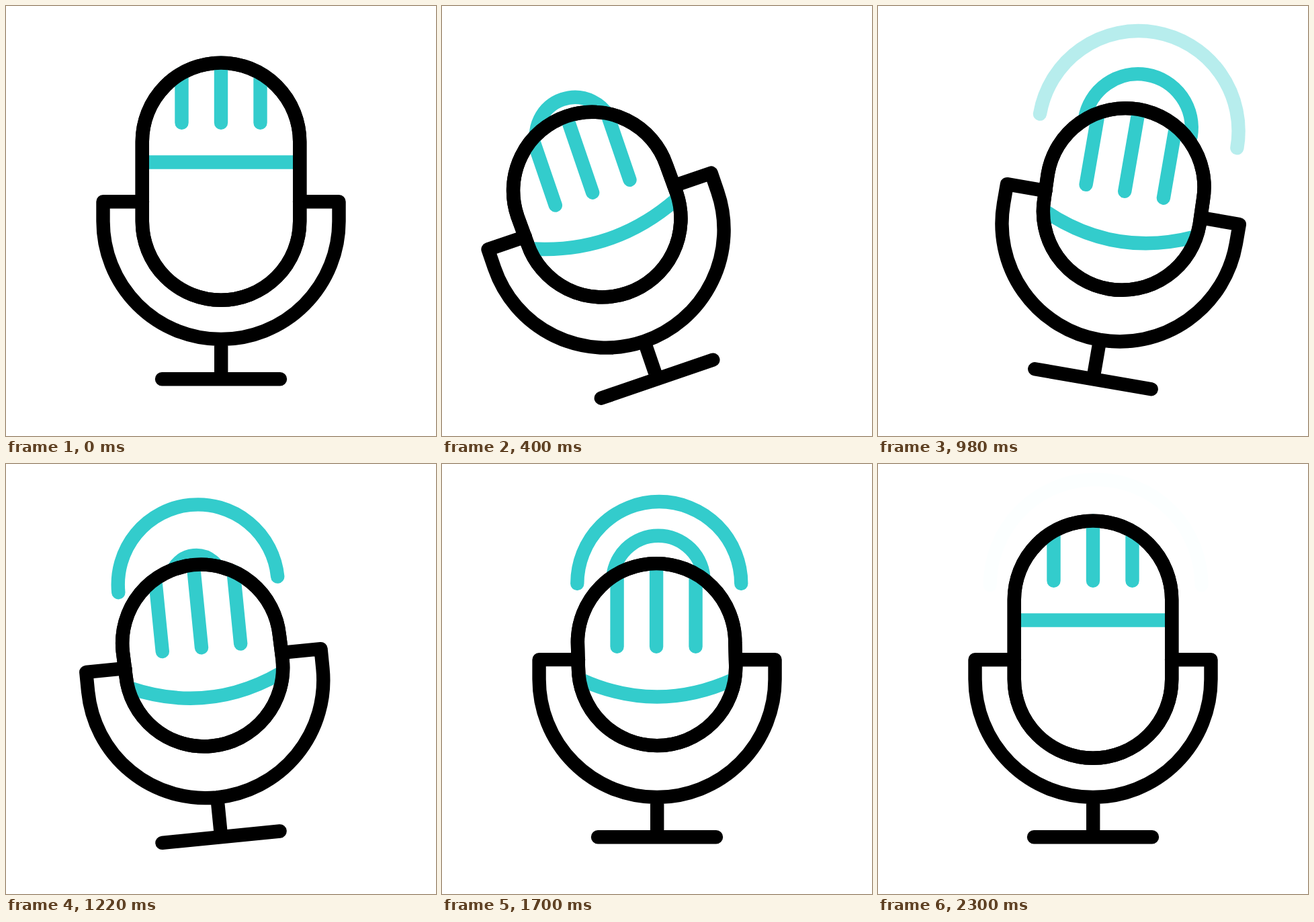
An HTML page for the animation above (2.4 s loop, 640 px wide and 640 px high).

```html
<!DOCTYPE html>
<html lang="en">
<head>
<meta charset="utf-8">
<title>Microphone</title>
<style>
  html, body { margin: 0; width: 100%; height: 100%; overflow: hidden; background: #fff; }
  svg { display: block; width: 100%; height: 100%; }
  path { fill: none; stroke: #000; stroke-width: 20.4; stroke-linecap: round; stroke-linejoin: round; }
  .teal, #waves path { stroke: #33cccc; }
  #band { stroke-linecap: butt; }
  #shell { fill: #fff; }
  #rim { fill: none; }
</style>
</head>
<body>
<svg viewBox="0 0 640 640">
  <g id="mic">
    <g id="waves"></g>
    <path id="shell"/>
    <path id="bars" class="teal"/>
    <path id="band" class="teal"/>
    <path id="rim"/>
    <path d="M203 291.2H144.5V320.5A175.5 175.5 0 0 0 495.5 320.5V291.2H437M320.2 496V555.2M232 555.2H408"/>
  </g>
</svg>
<script>
const LOOP = 2400, REST = 2300;
const R = 117.2;
const WAVE_DELAYS = [0, 460, 920, 1248];
// start, end, change in degrees
const SWINGS = [
  [0, 590, -25], [605, 920, 37], [920, 1195, -18], [1195, 1415, 9], [1415, 1712, -3]
];

const el = id => document.getElementById(id);
const [mic, shell, rim, bars, band] = ['mic', 'shell', 'rim', 'bars', 'band'].map(el);
const waves = WAVE_DELAYS.map(() =>
  el('waves').appendChild(document.createElementNS('http://www.w3.org/2000/svg', 'path')));

function ease(t, from, to) {
  const s = Math.min(1, Math.max(0, (t - from) / (to - from)));
  return s * s * (3 - 2 * s);
}

function drawWave(path, t) {
  const r = 58 + 0.1754 * (t - 400) - 5.85e-5 * (t - 400) * (t - 660);
  const alpha = 1 - ease(t, 850, 1067);
  const shown = t > 0 && r > 1 && alpha > 0;
  path.style.display = shown ? '' : 'none';
  if (!shown) return;
  const cx = 320 + 0.026 * r, cy = 170 + 0.066 * r;
  path.setAttribute('d', `M${cx - r} ${cy}A${r} ${r} 0 0 1 ${cx + r} ${cy}`);
  path.style.opacity = alpha;
}

function drawHead(t) {
  const press = ease(t, 0, 500) - ease(t, 1750, 2250);
  const lift = ease(t, 0, 450) - ease(t, 1690, 2200);
  const x = 320 - press;
  const top = 201.8 + 63.5 * press;
  const bottom = 320.5 - 18.6 * lift;

  const capsule = `M${x - R} ${top}A${R} ${R} 0 0 1 ${x + R} ${top}L${320 + R} ${bottom}` +
    `A${R} ${R} 0 0 1 ${320 - R} ${bottom}Z`;
  shell.setAttribute('d', capsule);
  rim.setAttribute('d', capsule);

  const barEnd = 173.8 + 98 * press;
  bars.setAttribute('d', [-58.5, 0, 58.5].map(dx =>
    `M${x + dx} ${top - Math.sqrt(R * R - dx * dx)}V${barEnd}`).join(''));

  const side = 232.5 + 88.5 * press, sag = 51 * press;
  band.setAttribute('d', `M${320 - 113} ${side}Q320 ${side + sag} ${320 + 113} ${side}`);
}

function frame(now) {
  const t = Math.min(now % LOOP, REST);
  const angle = SWINGS.reduce((sum, [a, b, d]) => sum + d * ease(t, a, b), 0);
  mic.setAttribute('transform', `rotate(${angle} 320 555)`);
  waves.forEach((path, i) => drawWave(path, t - WAVE_DELAYS[i]));
  drawHead(t);
}

let start;
function tick(now) {
  start ??= now;
  frame(now - start);
  requestAnimationFrame(tick);
}
frame(0);
requestAnimationFrame(tick);
</script>
</body>
</html>
```
